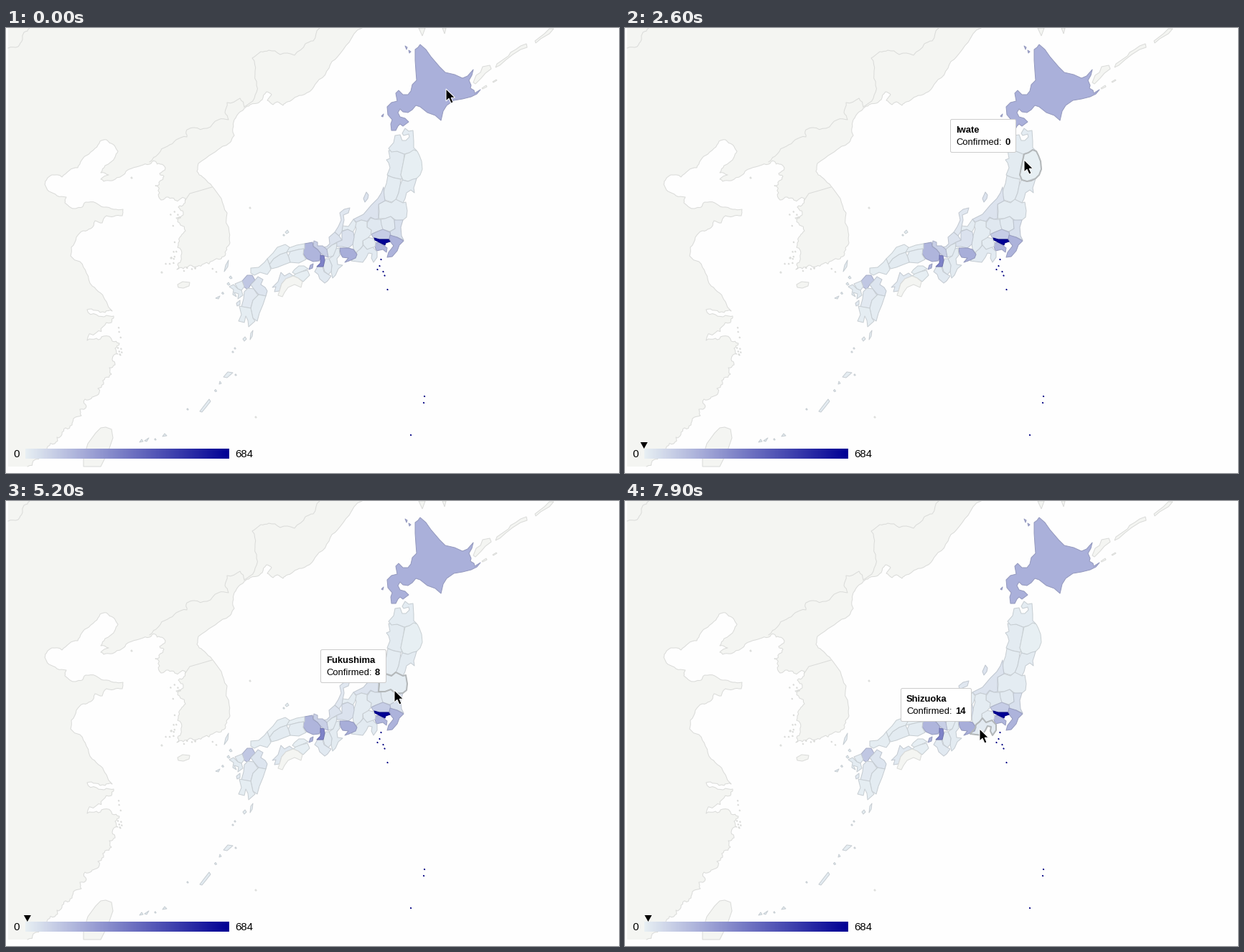
A matplotlib script for the animation above (8 s loop, 854 by 621 pixels).

```python
import matplotlib.pyplot as plt
import numpy as np
from matplotlib.animation import FuncAnimation
from matplotlib.patches import FancyBboxPatch, PathPatch, Polygon
from matplotlib.path import Path

W, H, DPI = 854, 621, 64
PX = 72 / DPI  # points per pixel
LAND, COAST = "#f4f5f2", "#dadbd9"
LOW, HIGH, TOP = np.array([231, 239, 243]) / 255, np.array([0, 0, 148]) / 255, 684
rng = np.random.default_rng(4)

plt.rcParams["font.family"] = "Liberation Sans"
fig = plt.figure(figsize=(W / DPI, H / DPI), dpi=DPI, facecolor="#fefefe")
ax = fig.add_axes([0, 0, 1, 1])
ax.set_axis_off()


def rough(flat, amp=0.15, passes=2):
    """Split each segment and push the midpoints sideways, like a coast."""
    pts = np.reshape(flat, (-1, 2)).astype(float)
    for _ in range(passes):
        d = np.diff(pts, axis=0)
        side = np.c_[-d[:, 1], d[:, 0]] * rng.uniform(-amp, amp, (len(d), 1))
        out = np.empty((2 * len(pts) - 1, 2))
        out[::2], out[1::2] = pts, pts[:-1] + d / 2 + side
        pts = out
    return pts


def border(pts):
    ax.plot(*np.transpose(pts), color=COAST, lw=PX, zorder=2)


def island(*flat):
    pts = np.reshape(flat, (-1, 2))
    ax.add_patch(Polygon(pts, fc=LAND, ec=COAST, lw=PX, zorder=2))


def speck(x, y, r=1.2):
    return [x - r, y, x, y - r, x + r, y + r / 2, x, y + r]


def islets(x, y, n, sx, sy):
    for cx, cy in rng.normal((x, y), (sx, sy), (n, 2)):
        island(*speck(cx, cy, 0.9))


def shade(value):
    t = value / TOP
    return LOW * (1 - t) + HIGH * t


regions, values = {}, {}


def region(name, value, *shapes):
    paths = [Path(np.reshape(s + s[:2], (-1, 2)), closed=True) for s in shapes]
    color = LAND if value is None else shade(value)
    edge = COAST if value is None else color * 0.87
    patch = PathPatch(Path.make_compound_path(*paths), fc=color, ec=edge,
                      lw=PX, joinstyle="round", zorder=3)
    ax.add_patch(patch)
    regions[name], values[name] = patch.get_path(), value


# Mainland
primorye = rough([
    496, 0, 478, 20, 462, 40, 450, 56, 436, 72, 426, 86, 412, 94, 400, 99,
    390, 104, 386, 108, 378, 103, 372, 107, 364, 101, 370, 93, 363, 89,
    357, 100, 350, 105, 338, 109, 332, 112, 325, 118, 318, 128, 316, 140,
    318, 150, 312, 160, 302, 165, 288, 175, 268, 189, 266, 200, 274, 208,
    282, 216, 289, 223, 300, 238, 308, 258, 311, 285, 312, 300, 307, 307], 0.12)
korea = rough([
    307, 307, 306, 315, 300, 322, 288, 325, 276, 329, 266, 333, 256, 331,
    247, 336, 238, 337, 240, 328, 244, 320, 244, 310, 240, 300, 244, 290,
    250, 283, 243, 275, 237, 265, 245, 262, 246, 255, 240, 250, 248, 245,
    250, 238, 235, 240, 226, 236, 216, 240, 214, 230, 208, 220, 215, 213,
    220, 207, 214, 203, 222, 195, 215, 190, 208, 186, 200, 190], 0.3)
bohai = rough([
    200, 190, 188, 192, 175, 196, 162, 206, 148, 213, 136, 214, 132, 211,
    143, 205, 132, 202, 138, 192, 152, 180, 156, 172, 150, 163, 140, 156,
    131, 158, 124, 168, 112, 178, 105, 185, 100, 195, 88, 199, 78, 208,
    64, 205, 57, 211, 54, 218, 60, 228, 71, 234, 84, 236, 82, 244, 97, 252,
    106, 250, 111, 243, 125, 244, 136, 250, 150, 253, 163, 253, 162, 262,
    150, 263, 140, 262, 134, 272, 124, 269, 118, 280, 108, 283, 98, 292,
    91, 306, 90, 318, 103, 326, 112, 342, 120, 360, 132, 370, 140, 382,
    148, 395], 0.13)
south = rough([
    148, 395, 138, 397, 125, 394, 113, 393, 126, 400, 140, 401, 150, 402,
    147, 411, 135, 417, 126, 425, 113, 436, 126, 433, 136, 430, 148, 437,
    158, 440, 152, 447, 156, 455, 148, 462, 152, 470, 144, 474, 147, 483,
    138, 488, 136, 497, 128, 503, 126, 513, 119, 517, 110, 518, 112, 528,
    103, 532, 105, 541, 94, 545, 92, 554, 83, 558, 78, 567, 71, 571, 68, 580,
    58, 584, 48, 594, 38, 604, 30, 612], 0.3)
coast = np.vstack([primorye, korea, bohai, south])
ax.add_patch(Polygon(np.vstack([[3, 0], coast, [3, 612]]), fc=LAND, ec="none"))
border(coast)
border(rough([3, 28, 17, 26, 23, 16, 25, 6, 33, 0]))
border(rough([437, 0, 428, 18, 417, 22, 402, 38, 382, 37, 366, 31, 355, 33,
              343, 42, 347, 60, 349, 80, 346, 98, 332, 110]))
border(rough([332, 110, 326, 98, 308, 104, 305, 118, 310, 128, 296, 128,
              280, 140, 262, 139, 252, 142, 252, 152, 237, 156, 225, 165,
              212, 176, 200, 187]))
border([[250, 240], [256, 231], [270, 227], [287, 222]])

# Islands without data
island(139, 557, 147, 560, 149, 572, 142, 592, 134, 608, 132, 612, 108, 612,
       108, 600, 114, 580, 125, 565, 132, 558)
island(239, 358, 246, 354, 256, 355, 255, 360, 247, 363, 240, 362)
island(575, 0, 580, 11, 584, 0)
island(608, 0, 611, 8, 613, 0)
island(651, 76, 655, 66, 661, 62, 664, 54, 674, 52, 676, 57, 668, 63, 662, 70,
       654, 78)
island(684, 50, 700, 39, 703, 34, 710, 30, 717, 25, 725, 22, 726, 27, 717, 30,
       706, 37, 697, 44, 688, 52, 682, 55)
island(737, 18, 750, 8, 757, 1, 763, 1, 757, 8, 745, 15, 738, 21)
island(663, 84, 669, 80, 670, 82, 664, 85)
island(678, 75, 683, 72, 684, 73, 679, 76)
for spot in [(340, 251), (217, 341), (175, 209), (230, 321), (348, 543)]:
    island(*speck(*spot))
islets(234, 318, 9, 4, 8)
islets(236, 262, 6, 4, 8)
islets(157, 445, 9, 2, 12)
islets(262, 337, 7, 12, 2)

# Hokkaido and the north
region("Hokkaido", 181, [
    577, 23, 585, 30, 592, 40, 604, 54, 612, 62, 625, 65, 636, 70, 643, 67,
    651, 58, 649, 66, 645, 73, 648, 80, 647, 84, 652, 87, 653, 91, 661, 86,
    656, 92, 648, 96, 636, 99, 624, 101, 614, 108, 609, 116, 606, 129, 598, 122,
    587, 118, 577, 110, 571, 108, 566, 114, 560, 118, 553, 117, 549, 113,
    546, 118, 549, 124, 556, 126, 561, 131, 553, 137, 549, 134, 546, 137,
    543, 143, 537, 143, 536, 134, 538, 128, 532, 121, 531, 110, 537, 104,
    545, 102, 543, 91, 547, 87, 553, 93, 560, 93, 564, 88, 566, 79, 572, 73,
    571, 60, 570, 45, 570, 30, 574, 27],
    [556, 25, 559, 27, 558, 30], [561, 31, 564, 33, 562, 35],
    [523, 123, 526, 120, 525, 124])
region("Akita", 11, [
    533, 171, 545, 172, 555, 176, 554, 185, 552, 195, 550, 205, 552, 211,
    545, 210, 537, 208, 531, 205, 535, 195, 533, 188, 530, 184, 535, 182])
region("Aomori", 9, [
    533, 168, 540, 160, 542, 150, 549, 149, 552, 157, 557, 157, 562, 152,
    561, 148, 554, 150, 552, 147, 556, 140, 561, 144, 567, 143, 568, 158,
    568, 167, 572, 171, 562, 174, 555, 176, 545, 172, 537, 173])
region("Iwate", 0, [
    556, 176, 562, 174, 568, 170, 573, 172, 576, 178, 579, 186, 580, 197,
    577, 205, 572, 210, 566, 213, 560, 214, 553, 212, 550, 205, 552, 195,
    554, 185])
region("Yamagata", 8, [
    532, 206, 540, 209, 550, 211, 549, 220, 547, 230, 543, 240, 537, 243,
    528, 240, 526, 232, 527, 225, 530, 217])
region("Miyagi", 12, [
    552, 212, 560, 214, 567, 211, 572, 210, 570, 217, 568, 223, 569, 230,
    564, 226, 558, 230, 556, 238, 553, 244, 543, 240, 547, 230, 549, 220])
region("Fukushima", 8, [
    519, 246, 528, 241, 537, 244, 543, 239, 553, 244, 557, 243, 559, 255,
    558, 264, 553, 268, 544, 269, 536, 263, 528, 266, 519, 266, 520, 256])
region("Niigata", 33, [
    526, 222, 527, 235, 528, 241, 519, 246, 519, 266, 514, 267, 508, 264,
    503, 270, 495, 268, 488, 271, 484, 267, 498, 260, 509, 247, 518, 238,
    523, 230], [498, 238, 502, 229, 505, 233, 504, 238, 500, 243])

# Around the capital
region("Tochigi", 14, [
    522, 267, 528, 266, 536, 263, 541, 268, 542, 280, 535, 284, 525, 281,
    522, 274])
region("Ibaraki", 44, [
    541, 268, 553, 268, 550, 278, 551, 290, 554, 296, 545, 292, 536, 290,
    535, 284, 542, 280])
region("Gunma", 20, [
    503, 272, 508, 265, 514, 267, 522, 267, 523, 274, 525, 281, 515, 285,
    508, 288, 509, 282, 503, 278])
region("Saitama", 97, [
    509, 288, 515, 285, 525, 281, 535, 285, 536, 291, 533, 295, 520, 295,
    512, 293])
region("Chiba", 173, [
    535, 289, 545, 292, 554, 297, 548, 303, 545, 311, 538, 319, 531, 320,
    533, 313, 540, 304, 536, 299, 534, 294])
region("Kanagawa", 163, [
    514, 300, 520, 299, 527, 304, 531, 307, 530, 313, 525, 309, 516, 311,
    514, 305])
region("Yamanashi", 10, [
    497, 297, 504, 292, 512, 294, 515, 300, 514, 305, 510, 307, 503, 309,
    498, 304])
region("Tokyo", TOP, [
    513, 293, 520, 295, 533, 295, 535, 298, 529, 300, 528, 303, 520, 299,
    514, 296],
    *[speck(x, y, 0.7) for x, y in [
        (522.5, 323), (520.5, 332), (517.5, 337), (525.5, 340), (527.5, 345.5),
        (531.5, 365), (583, 514), (582, 523), (564, 568)]])

# Centre
region("Nagano", 8, [
    485, 272, 495, 268, 503, 270, 503, 278, 509, 282, 508, 289, 504, 293,
    497, 297, 497, 304, 493, 309, 488, 314, 484, 308, 483, 300, 485, 290,
    488, 280])
region("Shizuoka", 14, [
    481, 325, 488, 317, 489, 312, 494, 308, 498, 303, 503, 309, 511, 306,
    517, 312, 517, 320, 512, 327, 509, 321, 510, 315, 505, 314, 502, 320,
    497, 327, 489, 326])
region("Toyama", 8, [
    469, 276, 477, 277, 484, 267, 488, 272, 486, 280, 483, 285, 476, 281,
    468, 283])
region("Ishikawa", 22, [
    479, 251, 477, 258, 470, 261, 471, 268, 469, 277, 468, 284, 464, 290,
    458, 285, 463, 277, 467, 268, 465, 258, 471, 253])
region("Gifu", 36, [
    468, 284, 476, 281, 484, 285, 485, 292, 483, 302, 477, 307, 468, 305,
    461, 305, 460, 299, 468, 296])
region("Fukui", 34, [
    458, 285, 464, 290, 468, 296, 461, 299, 454, 303, 447, 309, 441, 306,
    447, 305, 451, 301, 450, 292])
region("Aichi", 186, [
    465, 307, 477, 307, 484, 309, 489, 316, 487, 321, 478, 325, 472, 327,
    477, 321, 469, 320, 466, 315])
region("Shiga", 12, [
    447, 309, 454, 303, 461, 300, 460, 310, 456, 318, 449, 320, 446, 314])
region("Mie", 12, [
    460, 308, 464, 307, 465, 317, 461, 322, 462, 330, 469, 331, 463, 336,
    459, 345, 455, 349, 453, 340, 454, 331, 450, 322, 456, 318])
region("Nara", 14, [
    445, 322, 450, 322, 454, 331, 453, 340, 449, 344, 444, 340, 442, 333])
region("Wakayama", 18, [
    434, 333, 441, 333, 443, 340, 449, 344, 453, 346, 448, 353, 444, 356,
    437, 350, 435, 344, 430, 340])
region("Kyoto", 92, [
    429, 297, 434, 299, 434, 304, 441, 304, 447, 309, 449, 320, 443, 318,
    438, 314, 434, 309, 428, 304])
region("Hyogo", 165, [
    416, 301, 427, 299, 428, 305, 434, 309, 438, 314, 439, 320, 436, 325,
    428, 326, 419, 322, 414, 315], [422, 337, 424, 331, 428, 329, 427, 335])
region("Osaka", 311, [
    438, 317, 443, 318, 444, 324, 442, 333, 433, 333, 438, 328])

# West
region("Tottori", 2, [
    394, 307, 405, 303, 416, 301, 416, 308, 408, 309, 396, 312, 391, 313])
region("Shimane", 2, [
    364, 322, 372, 314, 378, 306, 389, 302, 395, 306, 391, 313, 382, 316,
    373, 322, 367, 330],
    speck(387, 289), [389, 285, 392, 282, 394, 285, 391, 287])
region("Okayama", 10, [
    396, 312, 408, 309, 415, 308, 414, 316, 418, 323, 408, 328, 396, 327,
    393, 319])
region("Hiroshima", 11, [
    367, 330, 373, 322, 382, 316, 391, 313, 394, 320, 396, 327, 388, 330,
    378, 334, 370, 336])
region("Yamaguchi", 7, [
    341, 342, 341, 335, 352, 334, 360, 327, 364, 322, 367, 330, 369, 337,
    364, 344, 354, 341, 346, 345])
region("Kagawa", 3, [
    399, 341, 402, 337, 408, 332, 415, 332, 421, 336, 412, 340, 404, 344])
region("Ehime", 18, [
    371, 362, 379, 354, 383, 341, 388, 346, 395, 342, 400, 346, 390, 350,
    384, 357, 381, 367, 374, 368, 376, 361])
region("Tokushima", 3, [
    400, 346, 404, 343, 412, 340, 420, 338, 423, 345, 414, 354, 407, 349])
region("Kochi", None, [
    390, 350, 400, 346, 407, 349, 413, 354, 411, 362, 402, 358, 393, 362,
    388, 369, 385, 375, 379, 373, 381, 367, 384, 357])
region("Fukuoka", 115, [
    329, 353, 336, 345, 343, 345, 347, 352, 341, 358, 337, 365, 331, 361])
region("Oita", 29, [
    346, 353, 351, 347, 358, 351, 355, 358, 361, 362, 364, 367, 362, 374,
    352, 372, 345, 364, 341, 358])
region("Saga", 8, [
    319, 357, 329, 353, 332, 361, 328, 366, 323, 364])
region("Nagasaki", 11, [
    311, 361, 317, 358, 323, 364, 328, 366, 330, 373, 323, 378, 324, 371,
    318, 369, 321, 375, 316, 372, 317, 365],
    [304, 340, 306, 331, 310, 324, 309, 333], speck(313, 348, 2),
    [292, 377, 298, 374, 296, 378], speck(302, 370, 1.5), speck(310, 357, 2))
region("Kumamoto", 16, [
    332, 368, 337, 363, 345, 364, 351, 373, 344, 380, 341, 391, 328, 389,
    331, 378], [321, 384, 326, 380, 326, 386, 322, 388])
region("Miyazaki", 9, [
    352, 372, 362, 374, 358, 386, 353, 398, 350, 409, 344, 405, 341, 391,
    344, 380])
region("Kagoshima", 5, [
    325, 388, 341, 391, 344, 405, 347, 409, 338, 417, 337, 408, 334, 402,
    332, 411, 324, 409, 328, 400],
    [340, 435, 341, 426, 344, 422, 343, 430],
    [330, 434, 333, 431, 335, 434, 332, 437],
    [303, 487, 309, 480, 316, 481, 308, 488],
    [297, 497, 298, 493, 300, 496], speck(319, 447), speck(316, 452),
    speck(292, 506, 1.6), speck(320, 484))
region("Okinawa", 9, [
    270, 535, 276, 527, 283, 518, 285, 521, 278, 530, 273, 536],
    [186, 578, 189, 574, 191, 577], [193, 576, 199, 572, 196, 577],
    [218, 570, 221, 566, 224, 569], speck(253, 532), speck(208, 574))

# Colour scale
ramp = shade(np.linspace(0, TOP, 142)[:, None])[None]
ax.imshow(ramp, extent=(27, 311, 601, 587), aspect="auto",
          interpolation="nearest", zorder=4)
for x, label in [(10.5, "0"), (319, str(TOP))]:
    ax.text(x, 599, label, fontsize=15 * PX, va="baseline", zorder=5)

# Moving parts
marker = ax.add_patch(Polygon([[0, 0], [1, 0], [0, 1]], fc="black", ec="none",
                              zorder=5))
glow = ax.add_patch(PathPatch(regions["Iwate"], fc="none", ec="#b3b7b9",
                              lw=2 * PX, joinstyle="round", zorder=6))
box = ax.add_patch(FancyBboxPatch((0, 0), 1, 1, fc="white", ec="#cccccc", lw=PX,
                                  boxstyle="round,pad=0,rounding_size=2", zorder=7))
title, caption, count = [
    ax.text(0, 0, "", fontsize=13 * PX, weight=w, va="baseline", zorder=8)
    for w in ("bold", "normal", "bold")]
caption.set_text("Confirmed:")
ARROW = np.array([[0, 0], [0, 17], [4, 13.3], [7, 20], [10, 18.7], [7.2, 12.2],
                  [12.5, 12.2]])
pointer = ax.add_patch(Polygon(ARROW, fc="black", ec="white", lw=PX, zorder=9))

# Time in tenths of a second, pointer x and y, tooltip height above the pointer
KEYS = np.array([
    (0, 613, 85, 57), (9, 577, 120, 57), (15, 561, 144, 57), (18, 551, 160, 54),
    (20, 553, 170, 57), (21, 553, 170, 57), (28, 557, 189, 57),
    (29, 557, 189, 57), (30, 558, 197, 57), (31, 558, 197, 57),
    (34, 559, 205, 57), (35, 559, 205, 57), (38, 556, 217, 57),
    (39, 556, 217, 57), (43, 550, 236, 62), (48, 548, 250, 57),
    (52, 541, 264, 57), (55, 541, 288, 57), (56, 541, 288, 57),
    (65, 526, 298, 57), (66, 526, 298, 57), (69, 525, 299, 57),
    (75, 512, 309, 57), (79, 494, 318, 57)])
HOVERS = [(1, 8, "Hokkaido"), (15, 19, "Aomori"), (19, 22, "Akita"),
          (22, 36, "Iwate"), (40, 47, "Miyagi"), (48, 53, "Fukushima"),
          (53, 55, "Tochigi"), (55, 58, "Ibaraki"), (58, 62, "Saitama"),
          (62, 70, "Tokyo"), (70, 74, "Kanagawa"), (74, 80, "Shizuoka")]
HOVER_PARTS = [marker, glow, box, title, caption, count]


def update(frame):
    x, y, lift = (round(np.interp(frame, KEYS[:, 0], KEYS[:, k])) for k in (1, 2, 3))
    pointer.set_xy(ARROW + (x, y))
    name = next((n for start, end, n in HOVERS if start <= frame < end), None)
    for part in HOVER_PARTS:
        part.set_visible(name is not None)
    if name:
        value = values[name]
        mx = 26.5 + 284 * value / TOP
        marker.set_xy([[mx - 5, 578], [mx + 5, 578], [mx, 587]])
        glow.set_path(regions[name])
        width = 84 + 7.2 * len(str(value))
        left, top = round(x - 12 - width), y - lift
        box.set_bounds(left + 0.5, top + 0.5, round(width), 46)
        title.set_text(name)
        count.set_text(str(value))
        title.set_position((left + 8, top + 19))
        caption.set_position((left + 8, top + 36))
        count.set_position((left + 76, top + 36))
    return [pointer, *HOVER_PARTS]


ax.set_xlim(0, W)
ax.set_ylim(H, 0)
animation = FuncAnimation(fig, update, frames=80, interval=100, repeat=True,
                          repeat_delay=0, blit=False)
plt.show()
```
